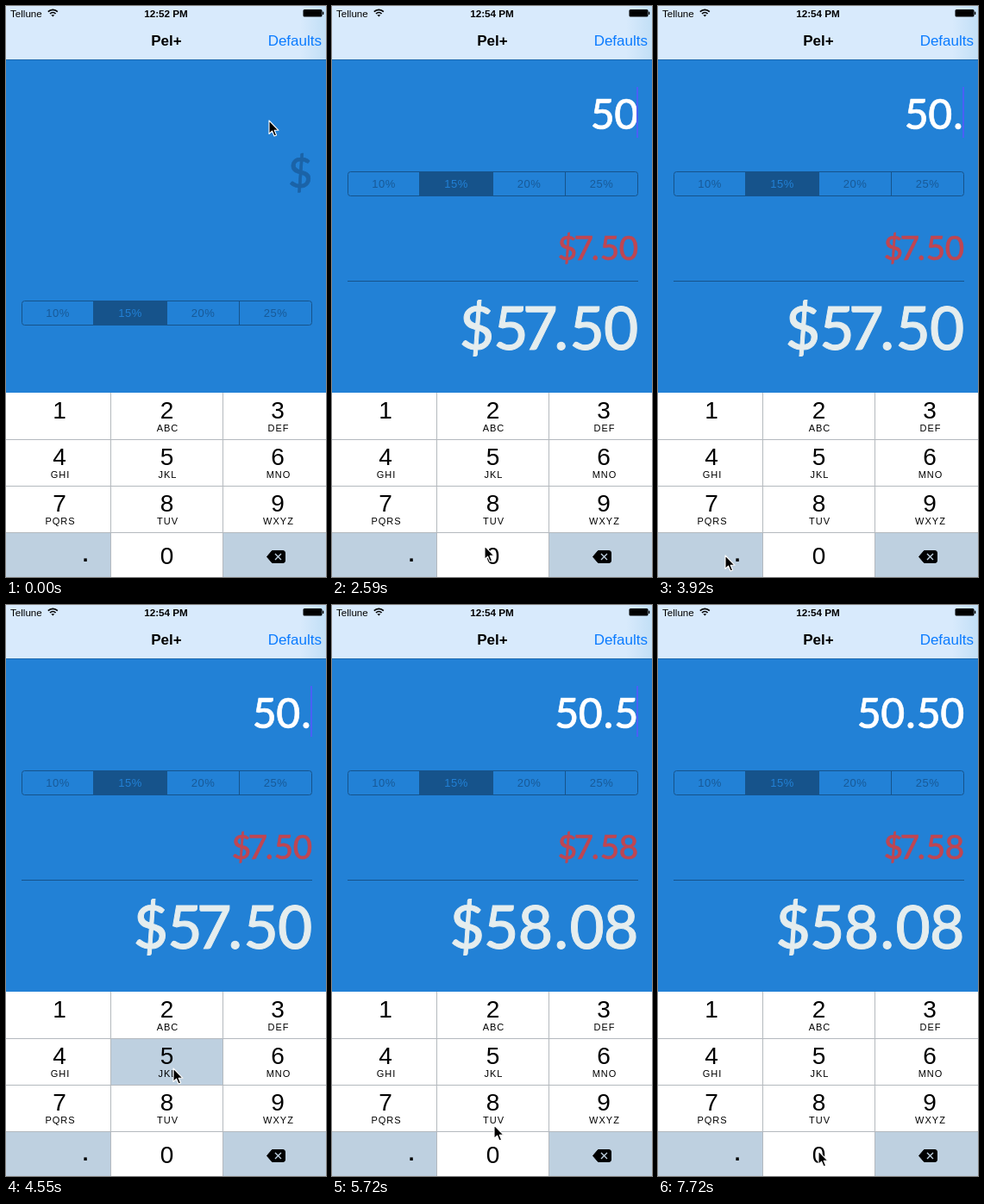
An HTML page that plays this animation: 371x663 px, repeating every 8 s.

```html
<!DOCTYPE html>
<html lang="en">
<head>
<meta charset="utf-8">
<title>Tip calculator</title>
<style>
  html, body { margin: 0; width: 100%; height: 100%; overflow: hidden; background: #2281d6; }
  svg { display: block; width: 100vw; height: 100vh; }
  text { font-family: "Liberation Sans", Arial, sans-serif; text-anchor: middle; }
  .bold { font-weight: 700; }
  .money {
    font-family: Lato, sans-serif; font-weight: 500; font-kerning: none;
    fill: currentColor; stroke: currentColor; stroke-width: .014em;
  }
  .digit { font-size: 28px; }
  .letters { font-size: 11px; letter-spacing: 1px; }
  .seg { font-size: 13px; letter-spacing: .5px; fill: #185a98; }
  .grid { stroke: #b4b9be; stroke-width: 1; }
  .dark { stroke: #16538b; fill: none; }
</style>
</head>
<body>
<svg viewBox="0 0 371 663" preserveAspectRatio="none">
  <defs>
    <linearGradient id="edge">
      <stop stop-color="#d8eafc"/>
      <stop offset="1" stop-color="#c2dff6"/>
    </linearGradient>
  </defs>
  <rect width="371" height="663" fill="#2281d6"/>

  <g id="navbar">
    <rect width="371" height="62" fill="#d8eafc"/>
    <rect x="341" width="30" height="62" fill="url(#edge)"/>
    <rect y="62" width="371" height="1" fill="#1d69ad"/>
    <text x="5" y="12.500" font-size="11.6" style="text-anchor:start">Tellune</text>
    <g fill="none" stroke="#000" stroke-width="1.7">
      <path d="M48.800 6.600a7.800 7.800 0 0 1 11 0M51 9a4.800 4.800 0 0 1 6.600 0"/>
      <path d="M52.300 10.300h4l-2 2.200z" fill="#000" stroke="none"/>
    </g>
    <text id="clock" class="bold" x="185.500" y="12.500" font-size="11.7"></text>
    <rect x="344.500" y="4" width="22" height="8.500" rx="1.500"/>
    <rect x="367" y="6.500" width="1.300" height="3.500" rx=".6"/>
    <text class="bold" x="186" y="46" font-size="17">Pel+</text>
    <text x="366" y="46" font-size="17" fill="#0a7bff" style="text-anchor:end">Defaults</text>
  </g>

  <g id="segments"></g>
  <path id="rule" class="dark" d="M18 319.500H355"/>
  <text id="entry" class="money"></text>
  <text id="tip" class="money" color="#bf4652"></text>
  <text id="total" class="money" color="#e5edee"></text>
  <rect id="caret" x="353" width="2" height="59" fill="#4a60f5"/>

  <g id="keypad"></g>

  <path id="pointer" d="M0 0V15.500L3.600 12.200 6 18 8.600 17 6.200 11.300H11Z" stroke="#fff" stroke-width="1.100" stroke-linejoin="round"/>
</svg>
<script>
const LOOP = 8000;
const RIGHT = 355;
const GRAY = '#bed0e0';
const ADVANCE = { '.': .28, '7': .395 };
const $ = id => document.getElementById(id);

// Each row: time, value held from then on.
const typed = [[0, ''], [2590, '50'], [3800, '50.'], [4600, '50.5'], [6120, '50.50']];
const caretOn = [[0, 0], [410, 1], [830, 0], [1230, .5], [2230, 0], [2590, 1], [2950, 0], [3450, 1],
  [4600, 0], [4660, 1], [5190, 0], [5720, 1], [6710, 0], [7180, 1], [7720, 0]];
const pressed = [[0, ''], [3740, 'dot'], [3860, ''], [4550, 'five'], [4660, ''], [6070, 'zero'], [6180, '']];

// Each row: start, end, steps, x, y reached at the end.
const moves = [
  [0, 0, 1, 305, 133],
  [290, 530, 5, 245, 232],
  [830, 1000, 4, 193, 400],
  [1060, 1230, 4, 200, 588],
  [1820, 1880, 2, 226, 627],
  [2590, 2590, 1, 177, 627],
  [2710, 3160, 9, 78, 638],
  [3980, 4490, 10, 194, 538],
  [5610, 5720, 3, 188, 604],
  [5770, 5880, 3, 186, 634]
];

function held(table, t) {
  let value = table[0][1];
  for (const [time, next] of table) if (t >= time) value = next;
  return value;
}

function pointerAt(t) {
  let x = 0, y = 0;
  for (const [start, end, steps, toX, toY] of moves) {
    if (t < start) break;
    const span = end - start;
    const done = t >= end ? 1 : (Math.floor((t - start) / span * (steps - 1)) + 1) / steps;
    x += (toX - x) * done;
    y += (toY - y) * done;
  }
  return [x, y];
}

// Right-aligned figures, each centred in its own advance.
function setMoney(el, value, em, baseline) {
  if (el.textContent === value && el.getAttribute('y') === String(baseline)) return;
  const centres = [];
  let x = RIGHT;
  for (const char of [...value].reverse()) {
    const width = em * (ADVANCE[char] || .55);
    centres.unshift((x - width / 2).toFixed(2));
    x -= width;
  }
  el.textContent = value;
  el.setAttribute('x', centres.join(' '));
  el.setAttribute('y', baseline);
  el.setAttribute('font-size', em * .965);
}

function buildSegments() {
  const edges = [18.5, 101.5, 186.5, 270.5, 354.5];
  const labels = ['10%', '15%', '20%', '25%'].map((label, i) =>
    `<text class="seg" x="${(edges[i] + edges[i + 1]) / 2}" y="19"${i === 1 ? ' style="fill:#2281d6"' : ''}>${label}</text>`);
  $('segments').innerHTML =
    `<rect x="101" width="86" height="29" fill="#16538b"/>
     <rect class="dark" x="18.5" y=".5" width="336" height="28" rx="3"/>
     <path class="dark" d="${edges.slice(1, 4).map(x => `M${x} 0V29`).join('')}"/>${labels.join('')}`;
}

function buildKeypad() {
  const columns = [62, 186.5, 315];
  const letters = ['', 'ABC', 'DEF', 'GHI', 'JKL', 'MNO', 'PQRS', 'TUV', 'WXYZ'];
  const keys = letters.map((group, i) => {
    const x = columns[i % 3], y = 449 + 54 * Math.floor(i / 3);
    return `<text class="digit" x="${x}" y="${y + 29.5}">${i + 1}</text>
      <text class="letters" x="${x + 1}" y="${y + 45}">${group}</text>`;
  });
  $('keypad').innerHTML =
    `<rect y="449" width="371" height="214" fill="#fff"/>
     <rect y="611" width="121" height="52" fill="${GRAY}"/>
     <rect x="251" y="611" width="120" height="52" fill="${GRAY}"/>
     <rect id="dot" x="60" y="611" width="61" height="52" fill="#fff"/>
     <rect id="five" x="121" y="503" width="130" height="54" fill="${GRAY}"/>
     <rect id="zero" x="121" y="611" width="130" height="52" fill="${GRAY}"/>
     <path class="grid" d="M0 503.5H371M0 557.5H371M0 611.5H371M121.5 449V663M251.5 449V663"/>
     ${keys.join('')}
     <text class="digit" x="186.5" y="648">0</text>
     <text class="bold" x="92" y="645" font-size="24">.</text>
     <path d="M302.500 639.500L308.500 632.500H321Q323.500 632.500 323.500 635V644Q323.500 646.500 321 646.500H308.500Z"
       stroke="#000" stroke-linejoin="round"/>
     <path d="M312 636l7 7m0-7l-7 7" stroke="${GRAY}" stroke-width="1.400"/>`;
}

function render(t) {
  const text = held(typed, t);
  const filled = text !== '';
  const amount = Number(text);
  const tip = Math.round(amount * 15 + 1e-6) / 100;

  $('clock').textContent = filled ? '12:54 PM' : '12:52 PM';
  $('entry').setAttribute('color', filled ? '#fff' : '#1b63a7');
  setMoney($('entry'), text || '$', 50, filled ? 143 : 211);
  setMoney($('tip'), filled ? '$' + tip.toFixed(2) : '', 40, 295);
  setMoney($('total'), filled ? '$' + (amount + tip).toFixed(2) : '', 72, 399);
  $('rule').style.display = filled ? '' : 'none';
  $('segments').setAttribute('transform', `translate(0 ${filled ? 192 : 342})`);

  $('caret').setAttribute('y', filled ? 94 : 162);
  $('caret').setAttribute('opacity', held(caretOn, t));
  for (const key of ['dot', 'five', 'zero']) {
    $(key).style.display = held(pressed, t) === key ? '' : 'none';
  }
  $('pointer').setAttribute('transform', `translate(${pointerAt(t)})`);
}

buildSegments();
buildKeypad();
const began = performance.now();
function tick() {
  render((performance.now() - began) % LOOP);
  requestAnimationFrame(tick);
}
tick();
</script>
</body>
</html>
```
